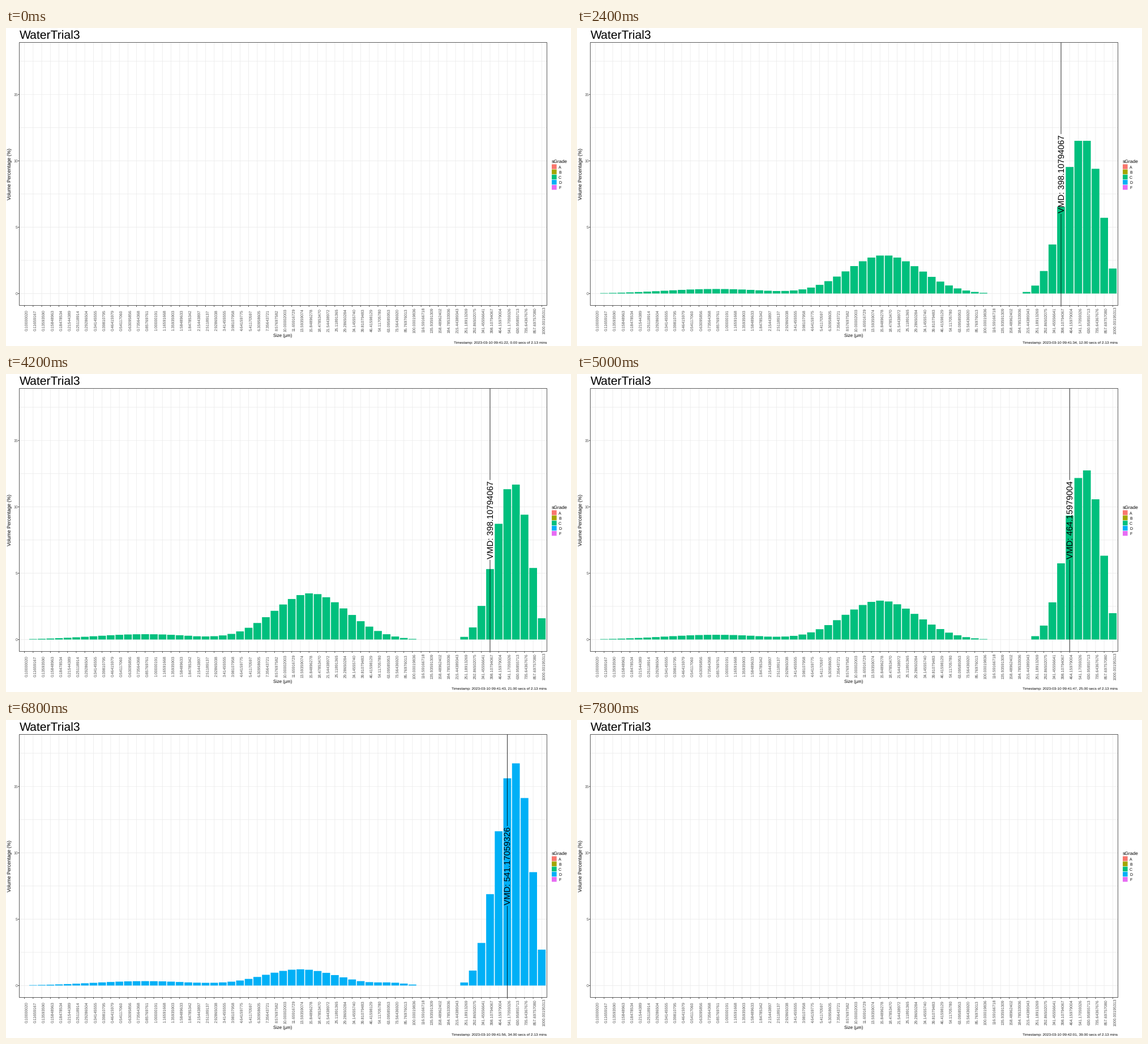
A matplotlib script that plays this animation: 998x561 px, repeating every 8000 ms.

```python
import numpy as np
import matplotlib.pyplot as plt
from matplotlib.animation import FuncAnimation
from matplotlib.patches import Rectangle

W, H, DPI = 998, 561, 100
FRAMES, STEP = 40, 200
LEFT, RIGHT, TOP, BOTTOM = 23.5, 955.5, 25.5, 489.5
BINS = 61
DX = (RIGHT - LEFT) / (BINS + 0.2)
ZERO, UNIT = 468.4, 23.41
MID = (TOP + BOTTOM) / 2
GAP = 70.5

GRADES = {"A": "#F8766D", "B": "#A3A500", "C": "#00BF7D",
          "D": "#00B0F6", "F": "#E76BF3"}
GRADE_CHANGE = 32
GRID, FRAME, TICK = "#EBEBEB", "#333333", "#4D4D4D"

plt.rcParams["font.family"] = "Liberation Sans"
plt.rcParams["text.hinting"] = "none"
plt.rcParams["path.snap"] = False

# Particle sizes: 15 bins per decade, in single precision, halves rounded up
K = np.arange(BINS)
SIZES = np.float32(0.1 * 10 ** (K / 15) * (1 + 1.966e-6))
LABELS = [f"{float(s) + 1e-10:.8f}" for s in SIZES]

# The spray drifts between these moments (seconds)
TIMES = [7, 12, 21, 29, 34]
FINE_PEAK = [0.32, 0.34, 0.40, 0.31, 0.33]
MEDIUM_PEAK = [0.79, 2.88, 3.48, 2.38, 1.22]
MEDIUM_MODE = [32.8, 33.5, 33.2, 33.0, 32.0]
GRIT_PEAK = [0.28, 0, 0, 0, 0.18]
COARSE_PEAK = [17.49, 11.78, 11.86, 13.86, 16.81]
COARSE_MODE = [56.81, 56.5, 56.63, 56.79, 56.81]
COARSE_WIDTH = [2.17, 2.32, 2.09, 2.21, 2.12]


def hump(peak, mode, width):
    """Bell curve over the bins that reaches zero in its far tails."""
    bell = np.exp(-((K - mode) / width) ** 2 / 2)
    return peak * np.clip(bell - 0.01, 0, None) / 0.99


def volumes(t):
    if t in (0, FRAMES - 1):
        return np.zeros(BINS)

    def at(values):
        return np.interp(t, TIMES, values)

    # The sensor loses the coarsest droplets
    cutoff = 1 - np.clip((K - 56.8) / 3.9, 0, 1) ** 3.6
    vol = (hump(at(FINE_PEAK), 14, 6.1)
           + hump(at(MEDIUM_PEAK), at(MEDIUM_MODE), 4.3)
           + hump(at(GRIT_PEAK), 42.7, 1.7)
           + hump(at(COARSE_PEAK), at(COARSE_MODE), at(COARSE_WIDTH)) * cutoff)
    return np.where(vol < 0.03, 0, vol)


def bin_x(k):
    return LEFT + (k + 0.6) * DX


def value_y(v):
    return ZERO - v * UNIT


def px(n):
    return n * 72 / DPI


fig = plt.figure(figsize=(W / DPI, H / DPI), dpi=DPI, facecolor="white")
ax = fig.add_axes([0, 0, 1, 1])
ax.set_xlim(0, W)
ax.set_ylim(H, 0)
ax.axis("off")


def line(x0, y0, x1, y1, color, z, width=0.8):
    return ax.plot([x0, x1], [y0, y1], color=color, lw=px(width), zorder=z,
                   solid_capstyle="butt")[0]


def text(x, y, s, size, color="black", ha="left", rot=0):
    return ax.text(x, y, s, fontsize=px(size), color=color, ha=ha,
                   va="baseline", rotation=rot, rotation_mode="anchor",
                   zorder=6)


for k, label in enumerate(LABELS):
    x = bin_x(k)
    line(x, TOP, x, BOTTOM, GRID, 1)
    line(x, BOTTOM, x, BOTTOM + 2.5, FRAME, 4)
    text(x + 5.9, 515.3, label, 7.05, TICK, "center", 90)

for v in np.arange(0, 18, 2.5):
    y = value_y(v)
    line(LEFT, y, RIGHT, y, GRID, 1)
    if v % 5 == 0:
        line(LEFT - 2.5, y, LEFT, y, FRAME, 4)
        text(21, y + 2.7, f"{v:.0f}", 7.05, TICK, "right")

ax.add_patch(Rectangle((LEFT, TOP), RIGHT - LEFT, BOTTOM - TOP, fill=False,
                       ec=FRAME, lw=px(0.8), zorder=5))

text(23.5, 19, "WaterTrial3", 21.1)
text(9.6, MID, "Volume Percentage (%)", 8.6, ha="center", rot=90)
text(489, 545.5, "Size (µm)", 7.8, ha="center")

text(964, 238, "sGrade", 8.5)
for n, (grade, color) in enumerate(GRADES.items()):
    y = 244.6 + 9.15 * n
    ax.add_patch(Rectangle((964, y - 4.2), 8.6, 8.4, fc=color, lw=0, zorder=3))
    text(976, y + 3.2, grade, 7.05)

bars = [ax.add_patch(Rectangle((bin_x(k) - 0.45 * DX, ZERO), 0.9 * DX, 0,
                               lw=0, zorder=2)) for k in K]
upper = line(0, TOP, 0, MID - GAP, "black", 4)
lower = line(0, MID + GAP, 0, BOTTOM, "black", 4)
vmd = text(0, MID, "", 15.05, ha="center", rot=90)
stamp = text(955.5, 556.3, "", 6.5, ha="right")


def draw(i):
    vol = volumes(i)
    color = GRADES["C" if i < GRADE_CHANGE else "D"]
    for bar, v in zip(bars, vol):
        bar.set_y(value_y(v))
        bar.set_height(v * UNIT)
        bar.set_facecolor(color)
        bar.set_visible(v > 0)

    spraying = vol.any()
    for item in (upper, lower, vmd):
        item.set_visible(spraying)
    if spraying:
        # Median bin: half of the volume is at least this coarse
        k = BINS - 1 - int(np.argmax(np.cumsum(vol[::-1]) >= 50))
        x = bin_x(k)
        upper.set_xdata([x, x])
        lower.set_xdata([x, x])
        vmd.set_x(x + 5.4)
        vmd.set_text("VMD: " + LABELS[k])

    minute, second = divmod(41 * 60 + 22 + i, 60)
    stamp.set_text(f"Timestamp: 2023-03-10 09:{minute:02d}:{second:02d}, "
                   f"{i:.2f} secs of 2.13 mins")
    return [*bars, upper, lower, vmd, stamp]


anim = FuncAnimation(fig, draw, frames=FRAMES, interval=STEP, repeat=True,
                     repeat_delay=0, init_func=lambda: draw(0))
plt.show()
```
